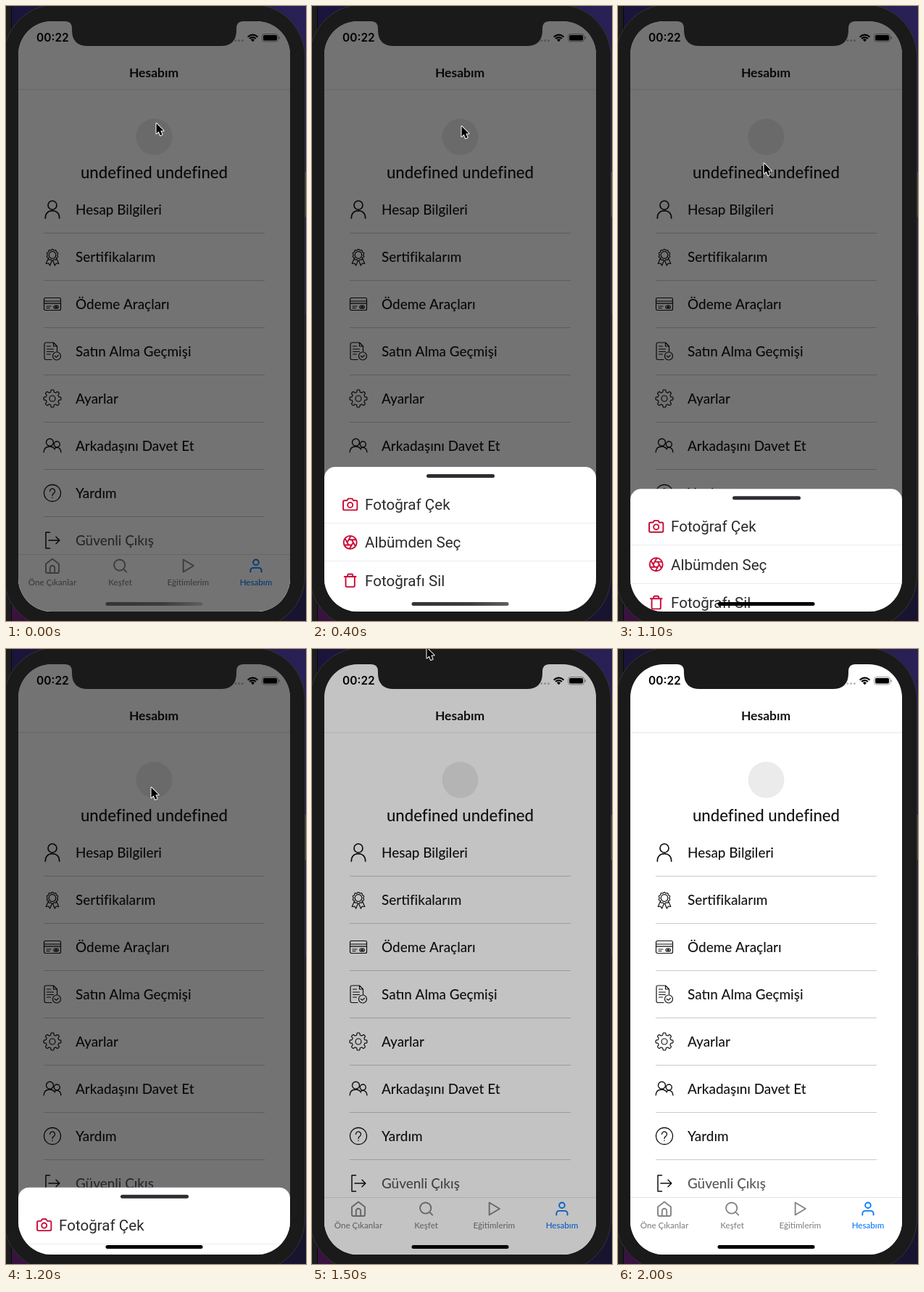
An HTML page with a canvas for the animation above (2300 ms loop, 414 by 846 pixels).

```html
<!DOCTYPE html>
<html lang="tr">
<head>
<meta charset="utf-8">
<title>Hesabım</title>
<style>
  html, body { margin: 0; width: 100%; height: 100%; overflow: hidden; background: #1b1b1b; }
  canvas { display: block; width: 414px; height: 846px; }
</style>
</head>
<body>
<canvas id="stage"></canvas>
<script>
const W = 414, H = 846, LOOP = 2300, STEP = 100;
const canvas = document.getElementById('stage');
const ctx = canvas.getContext('2d');
const dpr = window.devicePixelRatio || 1;
canvas.width = W * dpr;
canvas.height = H * dpr;

const LATO = 'Lato, "Open Sans", sans-serif';
const ROBOTO = 'Roboto, Inter, sans-serif';
const INK = '#151517', GRAY = '#858585', BLUE = '#0a7aff', RED = '#cb0a35';
const SHEET_TOP = 634, SCREEN_BOTTOM = 833;

// Rows of [time, value, ...]
const DIM = [[1300, .55], [1400, .486], [1500, .235], [1600, .016], [2000, 0]];
const POINTER = [
  [0, 207, 161], [400, 206, 165], [600, 202, 181], [700, 201, 200], [800, 201, 216],
  [1100, 201, 216], [1200, 200, 190], [1300, 197, 140], [1400, 188, 75], [1500, 158, -2], [1600, 120, -60]
];

function track(keys, t) {
  const i = keys.findIndex(k => k[0] > t);
  if (i === 0) return keys[0].slice(1);
  if (i < 0) return keys[keys.length - 1].slice(1);
  const a = keys[i - 1], b = keys[i], p = (t - a[0]) / (b[0] - a[0]);
  return a.slice(1).map((v, j) => v + (b[j + 1] - v) * p);
}

// cubic-bezier(.42, 0, 1, 1)
function easeIn(x) {
  if (x <= 0) return 0;
  if (x >= 1) return 1;
  let lo = 0, hi = 1, u = .5;
  for (let i = 0; i < 20; i++) {
    u = (lo + hi) / 2;
    const bx = 1.26 * (1 - u) ** 2 * u + 3 * (1 - u) * u * u + u ** 3;
    if (bx < x) lo = u; else hi = u;
  }
  return 3 * (1 - u) * u * u + u ** 3;
}

function box(x, y, w, h, r, color) {
  ctx.beginPath();
  ctx.roundRect(x, y, w, h, r);
  if (color) {
    ctx.fillStyle = color;
    ctx.fill();
  }
}

function text(str, x, y, font, color = INK, align = 'left') {
  ctx.font = font;
  ctx.fillStyle = color;
  ctx.textAlign = align;
  ctx.fillText(str, x, y);
}

function disc(x, y, r, color) {
  ctx.beginPath();
  ctx.arc(x, y, r, 0, Math.PI * 2);
  ctx.fillStyle = color;
  ctx.fill();
}

const ring = (x, y, r) => `M${x - r} ${y}a${r} ${r} 0 1 0 ${2 * r} 0a${r} ${r} 0 1 0 ${-2 * r} 0`;

// Icons are drawn around the centre of a 24 x 24 grid.
function icon(path, x, y, color, width, scale = 1) {
  ctx.save();
  ctx.translate(x, y);
  ctx.scale(scale, scale);
  ctx.translate(-12, -12);
  ctx.strokeStyle = color;
  ctx.lineWidth = width / scale;
  ctx.lineCap = ctx.lineJoin = 'round';
  ctx.stroke(path);
  ctx.restore();
}

function wave(r, amp, n, flat) {
  let d = '';
  for (let i = 0; i <= 160; i++) {
    const a = i / 160 * Math.PI * 2;
    const s = Math.cos(a * n);
    const k = r + amp * (flat ? Math.tanh(3 * s) : s);
    d += `${i ? 'L' : 'M'}${(12 + k * Math.sin(a)).toFixed(2)} ${(12 - k * Math.cos(a)).toFixed(2)}`;
  }
  return d + 'Z';
}

const p = d => new Path2D(d);
const sealWave = new Path2D();
sealWave.addPath(p(wave(7.4, .6, 10)), new DOMMatrix().translate(0, -2.5));
sealWave.addPath(p(ring(12, 9.5, 4.8) + 'M6.2 14.5L3.2 21.5L6.8 21L8.6 24L11.4 17.3M17.8 14.5L20.8 21.5L17.2 21L15.4 24L12.6 17.3'));

const ROWS = [
  ['Hesap Bilgileri', p(ring(12, 6, 6) + 'M2.3 24C2.3 17 6.5 13.6 12 13.6S21.7 17 21.7 24'), 1.7],
  ['Sertifikalarım', sealWave, 1.2],
  ['Ödeme Araçları', p('M2.5 3.5h19a2 2 0 0 1 2 2v13a2 2 0 0 1-2 2h-19a2 2 0 0 1-2-2v-13a2 2 0 0 1 2-2zM.5 8h23M.5 11.2h23M4 15h6M4 17.5h4' + ring(16, 16, 2) + ring(18.3, 16, 2)), 1.2],
  ['Satın Alma Geçmişi', p('M11 23.5H3a2 2 0 0 1-2-2V2a2 2 0 0 1 2-2h10.5l5 5v7.5M13.5 0v5h5M4.5 5h5M4.5 9h9M4.5 12.5h9M4.5 16h5' + ring(18, 18.5, 5.5) + 'M15.3 18.5l2.2 1.6l2.8-2.6'), 1.2],
  ['Ayarlar', p(wave(10.5, 1.5, 8, true) + ring(12, 12, 4)), 1.2],
  ['Arkadaşını Davet Et', p(ring(8.5, 7.2, 5) + ring(18.3, 10, 4) + 'M.2 20.8C.4 15.5 4 13 8.5 13C11.5 13 14 14.3 15.5 17M14.8 15.6C20 12.5 23.8 16 23.8 20.8'), 1.4],
  ['Yardım', p(ring(12, 12, 11.5) + 'M8.5 9.5a3.5 3.5 0 1 1 5.4 2.9C12.4 13.3 12 14 12 15.4M12 18v.3'), 1.3],
  ['Güvenli Çıkış', p('M8.5 1H3v22h5.5M7 12h14.5M17 7.2l4.8 4.8l-4.8 4.8'), 1.5]
];

const TABS = [
  ['Öne Çıkanlar', p('M3 9.5l9-7l9 7v10.5a2 2 0 0 1-2 2H5a2 2 0 0 1-2-2zM8.8 22v-7a3.2 3.2 0 0 1 6.4 0v7')],
  ['Keşfet', p(ring(11, 11, 8) + 'M21 21l-4.35-4.35')],
  ['Eğitimlerim', p('M5 3l15 9l-15 9z')],
  ['Hesabım', p(ring(12, 7, 4) + 'M20 21v-2a4 4 0 0 0-4-4H8a4 4 0 0 0-4 4v2')]
];

const ACTIONS = [
  ['Fotoğraf Çek', p('M23 19a2 2 0 0 1-2 2H3a2 2 0 0 1-2-2V8a2 2 0 0 1 2-2h4l2-3h6l2 3h4a2 2 0 0 1 2 2z' + ring(12, 13, 4))],
  ['Albümden Seç', p(ring(12, 12, 10) + 'M14.31 8l5.74 9.94M9.69 8h11.48M7.38 12l5.74-9.94M9.69 16L3.95 6.06M14.31 16H2.83M16.62 12l-5.74 9.94')],
  ['Fotoğrafı Sil', p('M3 6h18M19 6v14a2 2 0 0 1-2 2H7a2 2 0 0 1-2-2V6M8 6V4a2 2 0 0 1 2-2h4a2 2 0 0 1 2 2v2')]
];

function drawDevice() {
  const sky = ctx.createLinearGradient(0, 0, W, 0);
  sky.addColorStop(0, '#1a143a');
  sky.addColorStop(1, '#292056');
  ctx.fillStyle = sky;
  ctx.fillRect(0, 0, W, H / 2);
  const ground = ctx.createLinearGradient(0, 0, W, 0);
  ground.addColorStop(0, '#3a1240');
  ground.addColorStop(1, '#17142f');
  ctx.fillStyle = ground;
  ctx.fillRect(0, H / 2, W, H / 2);
  box(0, 0, 7, H, 0, '#1d1d1e');
  box(7, 0, 1, H, 0, '#09090b');
  box(-3, -2, 415.5, 858, 72, '#1a1a1a');
  ctx.strokeStyle = '#333335';
  ctx.lineWidth = 1;
  ctx.stroke();
  box(412.5, 228, 1.5, 62, 0, '#4a4a4c');
}

function drawStatus() {
  text('00:22', 42, 49, '600 15.5px Inter, sans-serif', '#000');
  for (let i = 0; i < 4; i++) disc(312 + i * 4.8, 47.5, 1.5, '#bdbdbd');
  ctx.strokeStyle = '#000';
  ctx.lineCap = 'butt';
  ctx.lineWidth = 2.2;
  for (const r of [9.3, 5.9]) {
    ctx.beginPath();
    ctx.arc(340.5, 49, r, -Math.PI * .76, -Math.PI * .24);
    ctx.stroke();
  }
  ctx.beginPath();
  ctx.moveTo(340.5, 49.3);
  ctx.arc(340.5, 49, 3.6, -Math.PI * .76, -Math.PI * .24);
  ctx.fillStyle = '#000';
  ctx.fill();
  box(353.5, 38.5, 22, 10.5, 3.2);
  ctx.strokeStyle = '#9a9a9a';
  ctx.lineWidth = 1;
  ctx.stroke();
  box(355, 40, 19, 7.5, 1.8, '#000');
  box(376.6, 42, 1.4, 3.6, 1, '#9a9a9a');
}

function drawPage() {
  box(17, 21, 375, 812, 0, '#fff');
  drawStatus();
  text('Hesabım', 204, 98, `700 17.5px ${LATO}`, INK, 'center');
  box(17, 114.5, 375, 1, 0, '#e4e4e4');
  disc(204.5, 180, 25, '#ebebeb');
  text('undefined undefined', 204.5, 237, `500 22.2px ${LATO}`, INK, 'center');

  ROWS.forEach(([label, path, width], i) => {
    const y = 280 + i * 65, last = i === ROWS.length - 1;
    icon(path, 64, y, '#111', width);
    text(label, 96, y + 7, `500 18.9px ${LATO}`, last ? '#58585a' : INK);
    if (!last) box(52, y + 32, 305, 1, 0, '#cbcbcb');
  });

  box(17, 754, 375, 79, 0, '#fff');
  box(17, 754, 375, 1, 0, '#e4e4e4');
  TABS.forEach(([label, path], i) => {
    const x = 64 + i * 93.65, color = i === 3 ? BLUE : GRAY;
    icon(path, x, 770, color, 1.9, i ? .95 : 1);
    text(label, x, 797, `500 11.6px ${LATO}`, color, 'center');
  });
}

function drawSheet(top) {
  if (top >= SCREEN_BOTTOM) return;
  box(17, top, 375, 260, [15, 15, 0, 0], '#fff');
  box(158, top + 10, 94, 5, 2.5, '#302d32');
  ACTIONS.forEach(([label, path], i) => {
    const y = top + 51.5 + i * 52.4;
    icon(path, 52.7, y, RED, 1.9, i === 1 ? .9 : .88);
    text(label, 73, y + 7.5, `400 20.6px ${ROBOTO}`, '#2b2b2d');
    if (i < 2) box(17, Math.round(y + 25.5), 375, 1, 0, '#ececec');
  });
}

function drawHomeBar(faded) {
  let color = '#000';
  if (faded) {
    color = ctx.createLinearGradient(138, 0, 272, 0);
    color.addColorStop(0, '#343434');
    color.addColorStop(.6, '#3d3d3d');
    color.addColorStop(1, '#606060');
  }
  box(137.5, 820, 134, 5, 2.5, color);
}

function drawNotch() {
  ctx.fillStyle = '#1a1a1a';
  ctx.fill(p('M82 20V21Q91 21 91 31V33Q91 55 113 55H296Q318 55 318 33V31Q318 21 327 21V20Z'));
}

function drawPointer(x, y) {
  ctx.save();
  ctx.translate(x, y);
  const arrow = p('M.5 .5V14.6L3.7 11.6L6 17L8.6 15.9L6.3 10.6H10.6Z');
  ctx.lineJoin = 'round';
  ctx.strokeStyle = '#fff';
  ctx.lineWidth = 2;
  ctx.stroke(arrow);
  ctx.fillStyle = '#000';
  ctx.fill(arrow);
  ctx.restore();
}

function draw(t) {
  const rise = easeIn((t - 20) / 280);
  const fall = easeIn((t - 1008) / 280);
  const travel = SCREEN_BOTTOM - SHEET_TOP;

  ctx.setTransform(dpr, 0, 0, dpr, 0, 0);
  drawDevice();
  ctx.save();
  box(17, 21, 375, 812, 46);
  ctx.clip();
  drawPage();
  box(17, 21, 375, 812, 0, `rgba(0,0,0,${track(DIM, t)[0]})`);
  drawSheet(SHEET_TOP + travel * (1 - rise + fall));
  drawHomeBar(t < 1000);
  ctx.restore();
  drawNotch();
  drawPointer(...track(POINTER, t));
}

const start = performance.now();
function tick() {
  const t = (performance.now() - start) % LOOP;
  draw(Math.floor(t / STEP) * STEP);
  requestAnimationFrame(tick);
}
tick();
</script>
</body>
</html>
```
